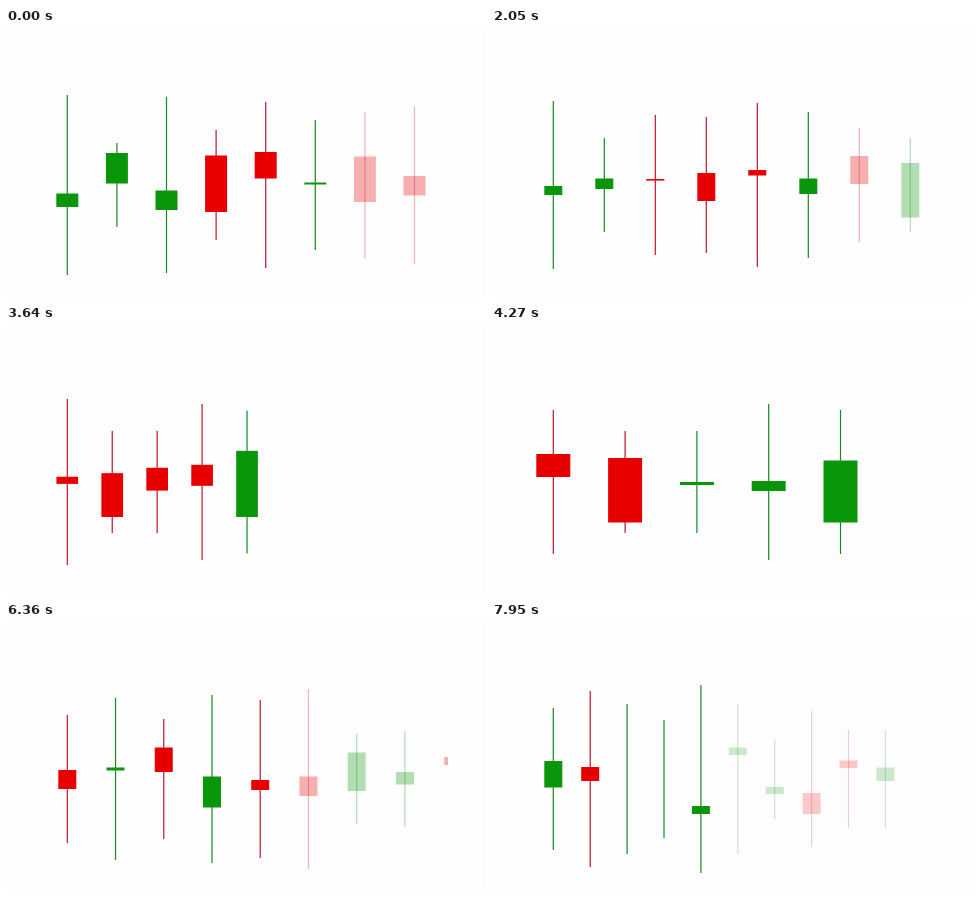
A matplotlib script that plays this animation: 480x269 px, repeating every 8 s.

```python
import numpy as np
import matplotlib.pyplot as plt
from matplotlib.animation import FuncAnimation
from matplotlib.patches import Rectangle

W, H, DPI = 480, 269, 100
LOOP, STEP = 8000, 40
X0, MIDLINE, CLIP = 61.3, 157, 441.5
GREEN, RED = "#0a960a", "#e80000"
GREEN_WICK, RED_WICK = "#148a20", "#c0142c"


def candles(*rows, rest=None):
    """Rows of wick reach around the midline, open, close; rest fills up."""
    pose = np.array(rows, float)
    return pose if rest is None else np.vstack([pose, rest[len(pose):]])


# Each chart borrows the candles it lacks from the one it turns into.
final = candles(
    (71, 165.5, 139), (88, 145, 159), (75, 156, 156), (59, 160, 160),
    (94, 192, 184), (75, 133, 125.5), (40, 172, 165), (68, 171, 192),
    (49, 138.5, 146), (49, 159, 145.5))
mixed = candles(
    (64, 148, 167), (81, 148.5, 145.5), (60, 125.5, 150), (84, 185.5, 154.5),
    (79, 158, 168), (90, 154.5, 174), (45, 169, 130.5), (48, 162.5, 150),
    (52, 135, 143), rest=final)
wide = candles(
    (72, 129, 152), (51, 133, 197.5), (51, 160, 157), (78, 166, 156),
    (72, 197.5, 135.5), (119, 155, 182), rest=mixed)
spread = candles(
    (88, 162, 162), (51, 155, 189.5), (51, 135, 169.5), (78, 128, 163),
    (71, 189.5, 121.5), (88, 183, 175.5), (57, 128, 156), (47, 189.5, 135),
    (74, 149.5, 135), (85, 128, 163))
drift = candles(
    (84, 167, 158), (47, 161, 150.5), (70, 151, 152.6), (68, 145, 173),
    (82, 142, 147.5), (73, 166, 150.5), rest=spread)
rally = candles(
    (90, 179, 165.5), (42, 155.5, 125), (88, 182, 162.5), (55, 127.5, 184),
    (83, 124, 150.5), (65, 156.5, 154.5), (73, 128.5, 174),
    (79, 148, 167.5), rest=drift)


def linear(u):
    return u


def smooth(u):
    return u * u * (3 - 2 * u)


def follow(t, value, moves, ease=smooth):
    """Carry value through moves of (begin, end, goal)."""
    for begin, end, goal in moves:
        u = np.clip((t - begin) / (end - begin), 0, 1)
        value = value + (goal - value) * ease(u)
    return value


# A new history slides in, then the forecast squeezes the chart together.
HISTORY_A, HISTORY_B = (860, 1250), (3500, 3950)
POSES = [(*HISTORY_A, drift), (2040, 2730, spread), (*HISTORY_B, wide),
         (4344, 6360, mixed), (6360, 7360, final)]
GAPS = [(*HISTORY_A, 55.2), (1720, 2750, 36.9), (*HISTORY_B, 71.8),
        (4344, 7600, 36.9)]
WIDTHS = [(*HISTORY_A, 30), (1700, 1780, 18), (*HISTORY_B, 34),
          (4780, 4880, 22), (5780, 5950, 18)]
FADES = [(300, 800, 0), (1690, 1800, 0.31), (2950, 3480, 0),
         (4850, 4950, 0.31), (7700, 8260, 0)]

fig = plt.figure(figsize=(W / DPI, H / DPI), dpi=DPI, facecolor="#fefdfe")
ax = fig.add_axes([0, 0, CLIP / W, 1])
ax.set(xlim=(0, CLIP), ylim=(H, 0))
ax.axis("off")


def boxes(zorder):
    return [ax.add_patch(Rectangle((0, 0), 0, 0, linewidth=0, snap=False,
                                   zorder=zorder)) for _ in final]


wicks, bodies = boxes(1), boxes(2)


def draw(frame):
    t = frame * STEP
    pose = follow(t, rally, POSES, linear)
    gap = follow(t, 49.6, GAPS)
    width = follow(t, 22, WIDTHS)
    faint = follow(t, 0.31, FADES)
    known = 6 if t < HISTORY_B[0] else 5
    for i, (reach, start, end) in enumerate(pose):
        x = X0 + i * gap
        up = end <= start
        alpha = 1 if i < known else faint
        wicks[i].set_bounds(x - 0.6, MIDLINE - reach, 1.2, 2 * reach)
        wicks[i].set(facecolor=GREEN_WICK if up else RED_WICK, alpha=alpha)
        bodies[i].set_bounds(x - width / 2, min(start, end), width,
                             abs(end - start))
        bodies[i].set(facecolor=GREEN if up else RED, alpha=alpha)
    return wicks + bodies


anim = FuncAnimation(fig, draw, frames=LOOP // STEP, interval=STEP,
                     repeat=True, repeat_delay=0, blit=False)
plt.show()
```
